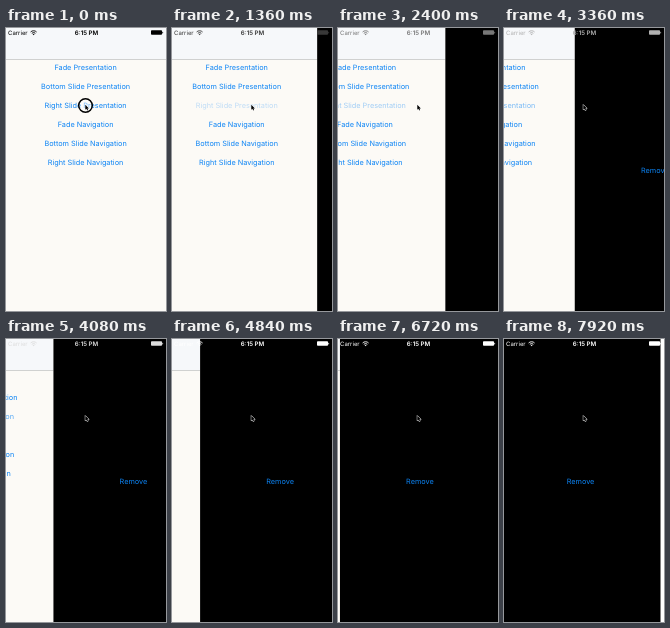
An HTML page that plays this animation: 160 by 283 pixels, repeating every 8 s.

```html
<!DOCTYPE html>
<html lang="en">
<head>
<meta charset="utf-8">
<title>Right slide presentation</title>
<style>
  html, body { margin: 0; width: 100%; height: 100%; overflow: hidden; background: #fff; }
  svg { display: block; width: 100%; height: 100%; }
  text { font-family: Inter, Roboto, sans-serif; text-rendering: geometricPrecision; }
  .button { font-size: 7.3px; fill: #0c84f5; text-anchor: middle; }
  .status { font-size: 6px; }
  .time { font-size: 6.2px; font-weight: 600; text-anchor: middle; }
</style>
</head>
<body>
<svg viewBox="0 0 160 283">
  <g id="menu">
    <rect width="160" height="283" fill="#fcfaf6"/>
    <rect width="160" height="31" fill="#f6f8fa"/>
    <rect y="31" width="160" height=".6" fill="#b4b6b8"/>
    <text class="button" x="79.6" y="41.7">Fade Presentation</text>
    <text class="button" x="79.6" y="60.7">Bottom Slide Presentation</text>
    <text class="button" x="79.6" y="79.8" id="pressed">Right Slide Presentation</text>
    <text class="button" x="79.6" y="98.9">Fade Navigation</text>
    <text class="button" x="79.6" y="117.9">Bottom Slide Navigation</text>
    <text class="button" x="79.6" y="137">Right Slide Navigation</text>
  </g>
  <g id="modal">
    <rect width="160" height="283"/>
    <text class="button" x="80" y="144.7">Remove</text>
  </g>
  <g id="status">
    <text class="status" x="2" y="6.8">Carrier</text>
    <g fill="none" stroke="currentColor" stroke-width=".9">
      <path d="M24.6 4a4.2 4.2 0 0 1 6 0M25.8 5.3a2.6 2.6 0 0 1 3.6 0"/>
    </g>
    <path d="M27.6 7.2l-1-1.1a1.5 1.5 0 0 1 2 0z"/>
    <text class="time" x="80.5" y="6.8">6:15 PM</text>
    <rect x="145" y="2.3" width="11" height="4.5" rx=".8"/>
    <rect x="156.3" y="3.8" width=".8" height="1.6" rx=".3"/>
  </g>
  <circle id="press" cx="79.5" cy="77.5" r="6.8" fill="#fff" fill-opacity=".4" stroke="#000" stroke-width="1.5"/>
  <path d="M79.3 76.7v5l1.1-1 .8 1.8.9-.4-.8-1.7h1.6z" stroke="#fff" stroke-width="1" paint-order="stroke"/>
</svg>
<script>
  const LOOP = 8000, WIDTH = 160, RELEASE = 440, SLIDE_START = 490;
  const [menu, modal, status, pressed, press] =
    ["menu", "modal", "status", "pressed", "press"].map(id => document.getElementById(id));
  const clamp = v => Math.min(1, Math.max(0, v));

  // Underdamped spring from 1 to 0, starting at rest.
  function spring(seconds, frequency = 0.56, damping = 0.75) {
    const root = Math.sqrt(1 - damping ** 2);
    const angle = frequency * root * seconds;
    return Math.exp(-damping * frequency * seconds) *
      (Math.cos(angle) + damping / root * Math.sin(angle));
  }

  function buttonOpacity(ms) {
    if (ms < 120) return 1;
    if (ms < 160) return 0.5;
    return 0.2 + 0.8 * clamp((ms - RELEASE) / 5000) ** 1.6;
  }

  function draw(ms) {
    const edge = WIDTH * spring(Math.max(0, ms - SLIDE_START) / 1000);
    menu.setAttribute("transform", `translate(${edge - WIDTH})`);
    modal.setAttribute("transform", `translate(${edge})`);

    const level = Math.round(255 * clamp((ms - RELEASE) / 4200));
    const tint = `rgb(${level},${level},${level})`;
    status.style.fill = status.style.color = tint;

    pressed.style.opacity = buttonOpacity(ms);
    press.style.display = ms < RELEASE ? "" : "none";
  }

  const start = performance.now();
  function tick() {
    draw((performance.now() - start) % LOOP);
    requestAnimationFrame(tick);
  }
  tick();
</script>
</body>
</html>
```
